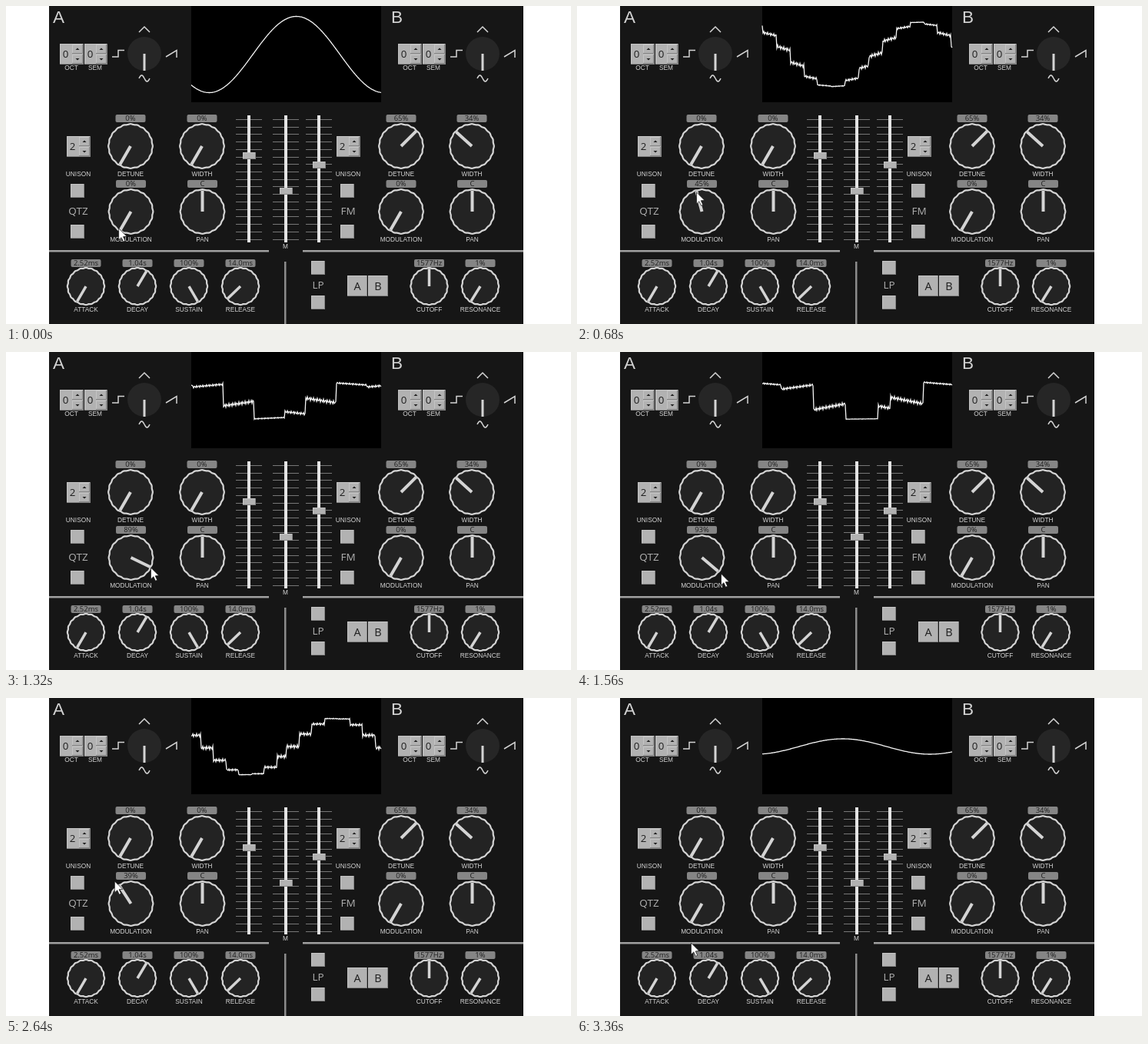
Write an HTML page with a canvas that moves like this. It is 735x413 px and loops after 3400 ms.

```html
<!DOCTYPE html>
<html lang="en">
<head>
<meta charset="utf-8">
<title>Synth panel</title>
<style>
html, body { margin: 0; width: 100%; height: 100%; overflow: hidden; background: #fff; }
canvas { display: block; }
</style>
</head>
<body>
<canvas id="stage" width="735" height="413"></canvas>
<script>
const ctx = document.getElementById('stage').getContext('2d');
const LOOP = 3400, STEP = 40, PERIOD = 227, TAU = Math.PI * 2;
const SANS = '"Liberation Sans", Arial, sans-serif';
const UI = '"Open Sans", "Noto Sans", sans-serif';
const LIGHT = '#d4d4d4', DARK = '#1e1e1e', GREY = '#b2b2b2';

// time, modulation, pointer angle, pointer radius, wave start, amplitude, step tilt
const keys = [
  [0, -.03, -144, 27, 321, 49.5, 0],
  [680, .45, -15.6, 26, 380, 42, -.3],
  [1320, .886, 116.6, 29, 390, 24, .15],
  [1560, .934, 130, 32.6, 408, 24, .2],
  [2080, .814, 92, 30, 498, 31, 0],
  [2640, .39, -36, 36, 592, 37, 0],
  [3360, -.1, -164.6, 53, 743, 10, 0]
];

function stateAt(t) {
  let i = 0;
  while (i < keys.length - 2 && keys[i + 1][0] <= t) i++;
  const a = keys[i], b = keys[i + 1];
  const k = Math.min(1, (t - a[0]) / (b[0] - a[0]));
  return a.map((v, j) => v + (b[j] - v) * k);
}

function rect(x, y, w, h, color) {
  ctx.fillStyle = color;
  ctx.fillRect(x, y, w, h);
}

function line(points, width, color = LIGHT) {
  ctx.beginPath();
  points.forEach(([x, y]) => ctx.lineTo(x, y));
  ctx.lineWidth = width;
  ctx.strokeStyle = color;
  ctx.stroke();
}

function text(s, x, y, size = 8.3, color = LIGHT, font = SANS) {
  ctx.font = `${size}px ${font}`;
  ctx.fillStyle = color;
  ctx.fillText(s, x, y);
}

function button(x, y, w = 18, h = 18) {
  rect(x, y, w, h, '#858585');
  rect(x, y, w - 1, h - 1, '#c4c4c4');
  rect(x + 1, y + 1, w - 2, h - 2, GREY);
}

function spinner(x, y, value, width = 31) {
  button(x, y, width, 27);
  const bx = x + width - 15, cx = bx + 7;
  button(bx, y + 1, 14, 12);
  button(bx, y + 14, 14, 12);
  for (const [cy, d] of [[y + 7, -1], [y + 20, 1]]) {
    ctx.fillStyle = DARK;
    ctx.beginPath();
    ctx.moveTo(cx - 2.5, cy - d);
    ctx.lineTo(cx + 2.5, cy - d);
    ctx.lineTo(cx, cy + 1.5 * d);
    ctx.fill();
  }
  text(value, x + 7.5, y + 14.5, 13.3, DARK, UI);
}

// Angles run clockwise from straight up.
function needle(x, y, angle, length, width) {
  const a = angle * Math.PI / 180;
  line([[x, y], [x + length * Math.sin(a), y - length * Math.cos(a)]], width);
}

function knob(x, y, r, angle, value, label) {
  const big = r > 25;
  ctx.beginPath();
  for (let i = 0; i <= 160; i++) {
    const a = i / 160 * TAU, q = r + .35 * Math.cos(a * 20);
    ctx.lineTo(x + q * Math.sin(a), y - q * Math.cos(a));
  }
  ctx.closePath();
  ctx.fillStyle = '#232323';
  ctx.fill();
  ctx.lineWidth = 2.2;
  ctx.strokeStyle = LIGHT;
  ctx.stroke();
  needle(x, y, angle, r - 1, big ? 4 : 3.5);
  const top = big ? y - 41 : y - 35;
  ctx.fillStyle = '#858585';
  ctx.beginPath();
  ctx.roundRect(x - 19.5, top, 39, 10, 2);
  ctx.fill();
  text(value, x, top + 5.3, 9.5, DARK, UI);
  text(label, x, big ? y + 36.5 : y + 31);
}

function oscillator(x, name) {
  text(name, x + 68.5, 16, 22.5);
  spinner(x + 70, 49, '0');
  spinner(x + 102, 49, '0', 30);
  text('OCT', x + 85, 80.5);
  text('SEM', x + 116, 80.5);
  ctx.fillStyle = '#262626';
  ctx.beginPath();
  ctx.arc(x + 180, 62, 22, 0, TAU);
  ctx.fill();
  needle(x + 180, 62, 180, 22, 3);
  line([[x + 138, 66], [x + 146, 66], [x + 146, 57.5], [x + 154, 57.5]], 1.5);
  line([[x + 173, 34], [x + 180, 27], [x + 187, 34]], 1.5);
  line([[x + 208, 66], [x + 222, 57.5], [x + 222, 67]], 1.5);
  const sine = [];
  for (let i = 0; i <= 14; i++) sine.push([x + 173 + i, 94 - 4 * Math.sin(i / 14 * TAU)]);
  line(sine, 1.5);
}

function voice(x, mode, rows) {
  spinner(x - 15, 169, '2');
  text('UNISON', x, 218.5);
  button(x - 10, 231);
  button(x - 10, 284);
  text(mode, x, 267, 13.5, '#b0b0b0', UI);
  rows.forEach(r => knob(r[0], r[1], 28.5, r[2], r[3], r[4]));
}

function slider(x, y) {
  for (let i = 0; i < 17; i++) rect(x - 17, Math.round(147 + i * 9.72), 34, 1, '#777');
  rect(x - 2, 142, 4, 165, '#e4e4e4');
  button(x - 8, y - 4, 17, 9);
}

// Sample-and-hold sine whose steps restart with every cycle.
function scope(mod, start, amp, tilt) {
  rect(241, 0, 247, 125, '#000');
  const width = Math.min(45 * mod, PERIOD / (20.3 - 16.7 * mod));
  const stepped = width > 1;
  const points = [];
  for (let x = 241; x <= 488; x++) {
    const u = ((x - start) % PERIOD + PERIOD) % PERIOD;
    const held = stepped ? Math.floor(u / width) * width : u;
    const phase = held / PERIOD * TAU, slope = Math.cos(phase);
    const slant = tilt * (u - held - width / 2) * slope;
    const hash = Math.min(1, mod * 3) * 2.2 * Math.abs(slope) * Math.sin(x * 2.4);
    points.push([x, 63 - amp * Math.sin(phase) + (stepped ? slant + hash : 0)]);
  }
  line(points, 1.3, '#f4f4f4');
}

function pointer(x, y) {
  ctx.beginPath();
  for (const [dx, dy] of [[0, 0], [0, 15], [3.4, 11.8], [6, 17.3], [8.3, 16.2], [5.8, 10.8], [10.5, 10.5]])
    ctx.lineTo(x + dx, y + dy);
  ctx.closePath();
  ctx.fillStyle = '#fff';
  ctx.fill();
  ctx.lineWidth = .7;
  ctx.strokeStyle = '#111';
  ctx.stroke();
}

function draw(t) {
  const [, rawMod, angle, radius, start, amp, tilt] = stateAt(t);
  const mod = Math.max(0, rawMod);
  ctx.textAlign = 'center';
  ctx.textBaseline = 'middle';
  rect(0, 0, 735, 413, '#fff');
  rect(56, 0, 617, 413, '#161616');

  oscillator(0, 'A');
  oscillator(440, 'B');
  scope(mod, start, amp, tilt);

  voice(94, 'QTZ', [
    [162, 182, -150, '0%', 'DETUNE'],
    [255, 182, -150, '0%', 'WIDTH'],
    [162.5, 267, mod * 300 - 150, Math.round(mod * 100) + '%', 'MODULATION'],
    [255.5, 267, 0, 'C', 'PAN']
  ]);
  voice(445, 'FM', [
    [514, 182, 45, '65%', 'DETUNE'],
    [606, 182, -48, '34%', 'WIDTH'],
    [514, 267, -150, '0%', 'MODULATION'],
    [606.5, 267, 0, 'C', 'PAN']
  ]);

  slider(316, 194);
  slider(364, 240);
  slider(407, 206);
  text('M', 363.5, 312.5);

  rect(56, 317, 286, 2.5, '#a0a0a0');
  rect(386, 317, 287, 2.5, '#a0a0a0');
  rect(362, 332, 2.5, 81, '#8c8c8c');

  [
    [104, -150, '2.52ms', 'ATTACK'],
    [171, 31, '1.04s', 'DECAY'],
    [238, 150, '100%', 'SUSTAIN'],
    [305, -134, '14.0ms', 'RELEASE'],
    [550.5, 0, '1577Hz', 'CUTOFF'],
    [617, -148, '1%', 'RESONANCE']
  ].forEach(([x, a, value, label]) => knob(x, 364, 23.8, a, value, label));

  button(397, 331);
  button(397, 376);
  text('LP', 406, 363.5, 13.5, '#b0b0b0', UI);
  button(444, 350, 26, 27);
  button(471, 350, 26, 27);
  text('A', 457, 365, 14.5, DARK, UI);
  text('B', 484, 365, 14.5, DARK, UI);

  const a = angle * Math.PI / 180;
  pointer(162.5 + radius * Math.sin(a), 267 - radius * Math.cos(a));
}

const begin = performance.now();
function tick() {
  const t = (performance.now() - begin) % LOOP;
  draw(Math.floor(t / STEP) * STEP);
  requestAnimationFrame(tick);
}
tick();
</script>
</body>
</html>
```
